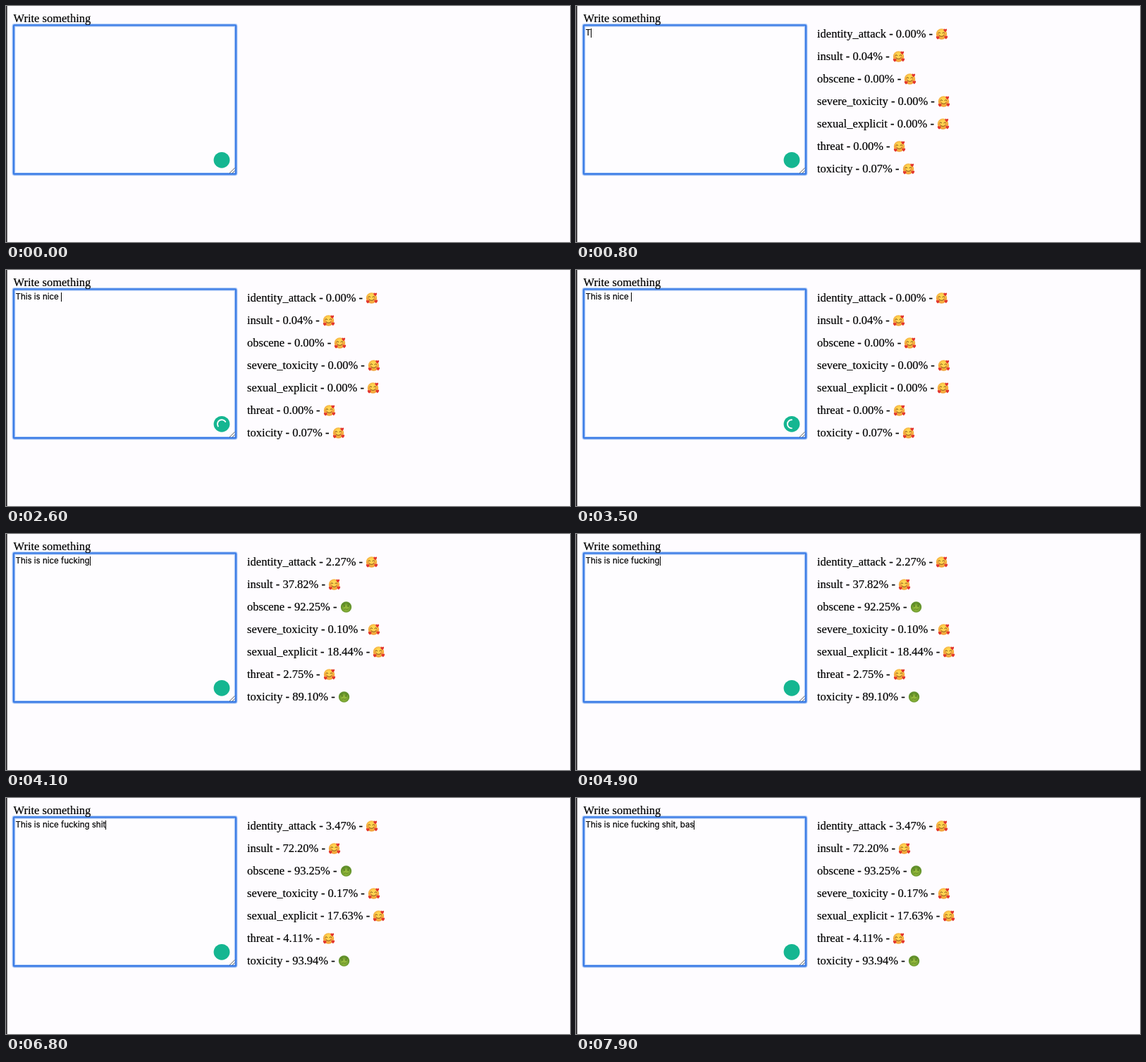
An HTML page for the animation above (8000 ms loop, 800x336 px).

```html
<!DOCTYPE html>
<html lang="en">
<head>
<meta charset="utf-8">
<title>Write something</title>
<style>
  html, body { margin: 0; width: 100%; height: 100%; overflow: hidden; background: #fefcff; }
  #stage { position: relative; width: 800px; height: 336px; overflow: hidden; color: #000;
    font: 16.5px/32px "Liberation Serif", Times, serif; -webkit-text-stroke: .2px #000; }
  #stage > * { position: absolute; white-space: pre; }
  #art { left: 0; top: 0; }
  #label { left: 10.5px; top: 2px; }
  #typed { left: 13.5px; top: 27.5px; font: 11.5px/20px Inter, Arial, sans-serif; }
  #caret { display: inline-block; width: 1px; height: 13px; background: #000; vertical-align: -3px; }
  #rows { left: 342px; top: 24px; }
  #rows div { height: 32px; }
  #rows svg { width: 18px; height: 18px; vertical-align: -3.5px; }
</style>
</head>
<body>
<div id="stage">
  <svg id="art" width="800" height="336">
    <defs>
      <radialGradient id="gold" cy=".4">
        <stop offset=".4" stop-color="#ffd650"/><stop offset="1" stop-color="#f3a43a"/>
      </radialGradient>
      <radialGradient id="green" cy=".6">
        <stop offset=".3" stop-color="#93b83c"/><stop offset="1" stop-color="#5f8f2a"/>
      </radialGradient>
      <path id="heart" d="M0 2.6C-4.2 -.4-1.8-3.4 0-1.3 1.8-3.4 4.2-.4 0 2.6Z" fill="#e2362f"/>
      <symbol id="happy" viewBox="0 0 18 18">
        <circle cx="8.5" cy="9" r="7.7" fill="url(#gold)"/>
        <g fill="#f28a3f" opacity=".6"><circle cx="4" cy="10" r="1.6"/><circle cx="12.6" cy="10" r="1.6"/></g>
        <path d="M3.8 7.5q1.5-2 3 0M9.8 7.5q1.5-2 3 0M5.2 11q3.3 3 6.6 0" fill="none"
          stroke="#7d4a16" stroke-width="1" stroke-linecap="round"/>
        <use href="#heart" x="13.8" y="3.6"/><use href="#heart" x="3.2" y="14"/><use href="#heart" x="14.8" y="13.6"/>
      </symbol>
      <symbol id="sick" viewBox="0 0 18 18">
        <circle cx="8.5" cy="9" r="7.7" fill="url(#green)"/>
        <g fill="#4a6a1c"><ellipse cx="5.8" cy="7.6" rx=".9" ry="1.1"/><ellipse cx="11.2" cy="7.6" rx=".9" ry="1.1"/></g>
        <path d="M4 5.6l2.4-.8M13 5.6l-2.4-.8M5.6 12.4q1.4-1.2 2.9-.3t2.9-.3" fill="none"
          stroke="#55771f" stroke-width=".8" stroke-linecap="round"/>
      </symbol>
      <rect id="box" x="10.9" y="27.4" width="315.2" height="211.9" rx="1"/>
    </defs>
    <rect width="1.7" height="336" fill="#2d2b2e"/>
    <use href="#box" fill="#fefdff" stroke="#b5cff8" stroke-width="4.8"/>
    <use href="#box" fill="none" stroke="#3c7de6" stroke-width="2.4"/>
    <path d="M317 238l7.5-7.5M321 238l3.5-3.5" stroke="#555" stroke-width=".9"/>
    <circle cx="306" cy="219.3" r="11.4" fill="#15b691"/>
    <path id="spinner" d="M-2.3 -5.6A6 6 0 0 1 2.3 5.6" fill="none"
      stroke="#fff" stroke-width="1.9" stroke-linecap="round"/>
  </svg>
  <div id="label">Write something</div>
  <div id="typed"><span id="words"></span><span id="caret"></span></div>
  <div id="rows"></div>
</div>
<script>
const LOOP = 8000;
const labels = ["identity_attack", "insult", "obscene", "severe_toxicity", "sexual_explicit", "threat", "toxicity"];

// Bursts of typing: start time, time per character, characters
const bursts = [
  [400, 100, "T"],
  [1000, 95, "his is ni"],
  [1900, 150, "ce "],
  [3700, 55, "fucking"],
  [5500, 22, " shit"],
  [7300, 130, ", bas"]
];

// Scores in percent and when they appear
const results = [
  [700, [0, 0.04, 0, 0, 0, 0, 0.07]],
  [4050, [2.27, 37.82, 92.25, 0.10, 18.44, 2.75, 89.10]],
  [6400, [3.47, 72.20, 93.25, 0.17, 17.63, 4.11, 93.94]]
];

const byId = id => document.getElementById(id);
const spinner = byId("spinner");
let shown;

function typedAt(t) {
  return bursts.map(([start, step, text]) =>
    text.slice(0, Math.max(0, Math.floor((t - start) / step) + 1))).join("");
}

function showScores(scores) {
  if (scores === shown) return;
  shown = scores;
  byId("rows").innerHTML = scores ? scores.map((score, i) =>
    `<div>${labels[i]} - ${score.toFixed(2)}% - <svg><use href="#${score > 75 ? "sick" : "happy"}"/></svg></div>`
  ).join("") : "";
}

function draw(now) {
  const t = now % LOOP;
  const text = typedAt(t);
  byId("words").textContent = text;
  byId("caret").style.visibility = text ? "visible" : "hidden";

  const latest = results.filter(([start]) => t >= start).pop();
  showScores(latest && latest[1]);

  const angle = (t - 1800) * 570 / 1700 - 8;
  spinner.style.visibility = t >= 1000 && t < 4050 ? "visible" : "hidden";
  spinner.setAttribute("transform", `translate(306 219.3) rotate(${angle})`);
  requestAnimationFrame(draw);
}
draw(0);
</script>
</body>
</html>
```
